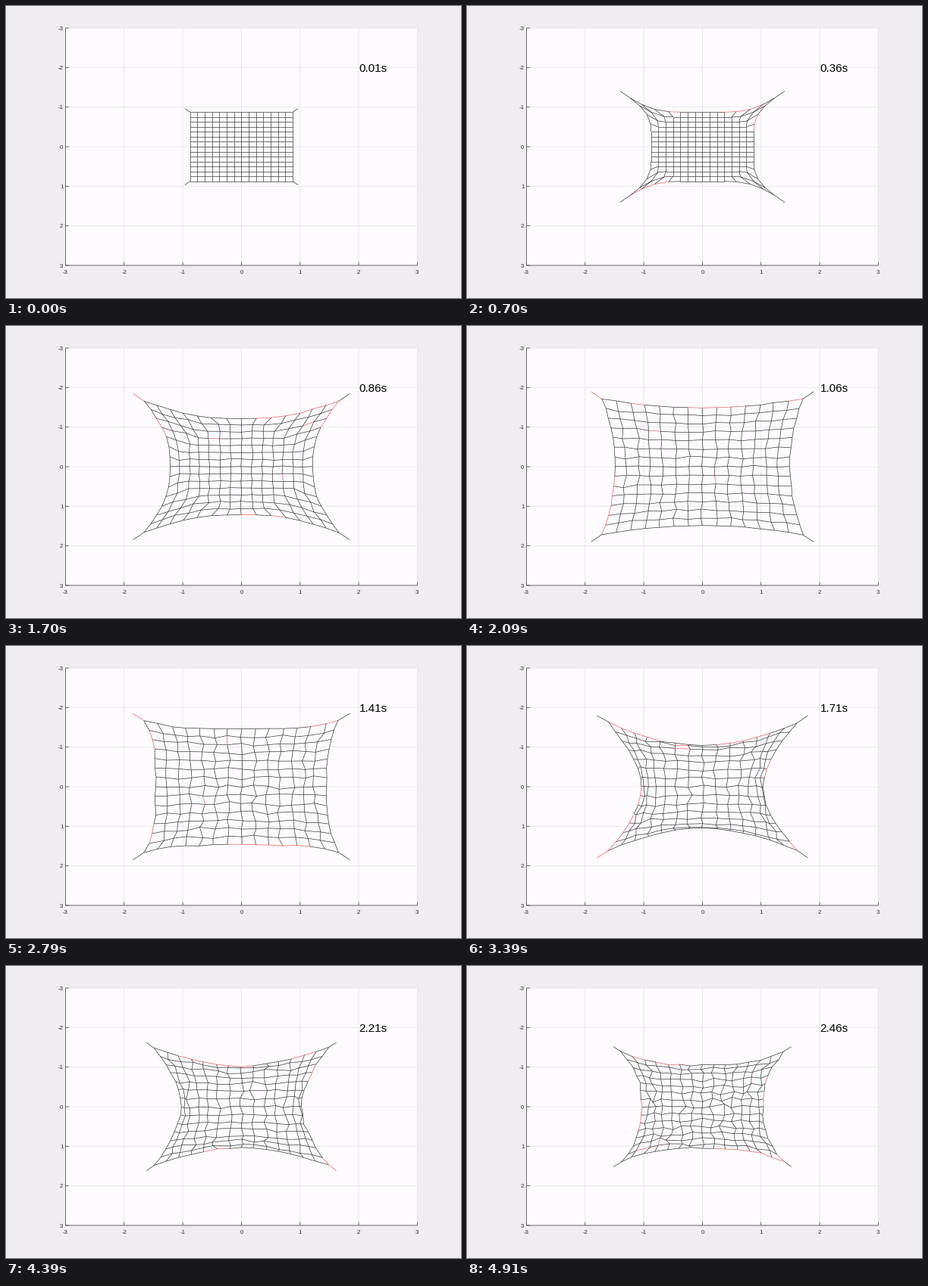
A matplotlib script that plays this animation: 600x386 px, repeating every 5 s.

```python
import numpy as np
import matplotlib.pyplot as plt
from matplotlib.animation import FuncAnimation
from matplotlib.collections import LineCollection

plt.rcParams["font.family"] = "Liberation Sans"
W, H, DPI = 600, 386, 100
PX = 72 / DPI
STEPS, SUB, INTERVAL = 50, 5, 20
DT = .05
N, ROPE = 15, .25
CENTRE, SCALE = np.array([310.4, 186.0]), np.array([77.33, 52.3])
INK, RED, AXIS, GRID = "#2a2a2a", "#f05050", "#505050", "#e3e2e4"

side = np.linspace(-1, 1, N)
UV = np.stack(np.meshgrid(side, side), axis=-1)
CORNERS = UV[::N - 1, ::N - 1]


def to_px(p):
    return CENTRE + SCALE * np.asarray(p, float)


def slopes(times, values, start, gain=1.0):
    h = np.diff(times).reshape((-1,) + (1,) * (values.ndim - 1))
    s = np.diff(values, axis=0) / h
    inner = gain * (s[:-1] * h[1:] + s[1:] * h[:-1]) / (h[1:] + h[:-1])
    return np.concatenate([[start], inner, s[-1:]])


def hermite(t, times, values, tangents):
    i = int(np.clip(np.searchsorted(times, t) - 1, 0, len(times) - 2))
    h = times[i + 1] - times[i]
    u = (t - times[i]) / h
    return ((1 + 2 * u) * (1 - u) ** 2 * values[i]
            + u * (1 - u) ** 2 * h * tangents[i]
            + u * u * (3 - 2 * u) * values[i + 1]
            + u * u * (u - 1) * h * tangents[i + 1])


# Distance of the four flying weights from the centre, along each axis.
TIP_T = np.array([.01, .61, .91, 1.06, 1.41, 1.71, 2.46])
TIPS = np.array([.965, 1.662, 1.87, 1.897, 1.85, 1.797, 1.518])
TIP_V = slopes(TIP_T, TIPS, 1.25)


def tip_at(t):
    return hermite(t, TIP_T, TIPS, TIP_V)


def tighten(net, tip):
    """One relaxation pass: strings longer than ROPE pull their ends together."""
    def excess(d):
        length = np.linalg.norm(d, axis=-1, keepdims=True)
        return d * np.clip(1 - ROPE / np.maximum(length, 1e-9), 0, None)

    pull = np.zeros_like(net)
    across = excess(np.diff(net, axis=1)) / 4
    down = excess(np.diff(net, axis=0)) / 4
    pull[:, :-1] += across
    pull[:, 1:] -= across
    pull[:-1] += down
    pull[1:] -= down
    pull[::N - 1, ::N - 1] += excess(CORNERS * tip - net[::N - 1, ::N - 1]) / 2
    return net + pull


def unfold(last_step, substeps=10, passes=40):
    """Fly the folded net open: free nodes drift, taut strings drag them."""
    net = before = .875 * UV
    states = [net]
    for n in range(1, last_step * substeps + 1):
        tip = tip_at(.01 + n * DT / substeps)
        net, before = 2 * net - before, net
        for _ in range(passes):
            net = tighten(net, tip)
        if n % substeps == 0:
            states.append(net)
    return states


def pose(corner, mid, bunch, power, wobble, seed):
    """Net with curved sides; bunch > 1 crowds the strings near mid-sides."""
    u, v = UV, np.abs(UV[..., ::-1])
    reach = mid + (corner - mid) * v ** power
    b = bunch + (1 - bunch) * v ** 2
    noise = np.random.default_rng(seed).normal(0, wobble, UV.shape)
    loose = np.where(np.abs(UV).max(-1, keepdims=True) < 1, 1, .4)
    return reach * (b * u + (1 - b) * u ** 3) + noise * loose


OPENING = unfold(12)
NET_T = np.array([.61, 1.06, 1.41, 1.71, 2.21, 2.46])
NETS = np.array([OPENING[-1],
                 pose(1.716, 1.49, 1.05, 2.0, .016, 1),
                 pose(1.665, 1.46, 1.05, 3.5, .022, 2),
                 pose(1.617, 1.04, 1.48, 1.8, .020, 3),
                 pose(1.488, 1.025, 1.37, 1.7, .022, 4),
                 pose(1.390, 1.045, 1.20, 2.7, .027, 5)])
NET_V = slopes(NET_T, NETS, (OPENING[-1] - OPENING[-2]) / DT, gain=.5)


def strings_at(step):
    t = .01 + DT * step
    net = (OPENING[step] if step < len(OPENING)
           else hermite(t, NET_T, NETS, NET_V))
    rows = np.stack([net[:, :-1], net[:, 1:]], axis=2)
    cols = np.stack([net[:-1], net[1:]], axis=2).transpose(1, 0, 2, 3)
    threads = np.stack([CORNERS * tip_at(t), net[::N - 1, ::N - 1]], axis=2)
    return np.concatenate([s.reshape(-1, 2, 2) for s in (rows, cols, threads)])


def taut_mask(step, segs):
    """Short runs of stretched string, mostly along the border."""
    rng = np.random.default_rng(100 + step)
    mask = np.zeros(len(segs), bool)
    for n in range(10):
        border = n < 7
        line = rng.choice([0, N - 1]) if border else rng.integers(1, N - 1)
        start = rng.integers(0, N - 1)
        stop = min(N - 1, start + (rng.integers(1, 5) if border else 1))
        first = (N - 1) * (line + N * rng.integers(2))
        mask[first + start:first + stop] = True
    mask[-4:] = rng.random(4) < .12
    return mask & (np.linalg.norm(segs[:, 1] - segs[:, 0], axis=1) > .19)


fig = plt.figure(figsize=(W / DPI, H / DPI), dpi=DPI, facecolor="#efedf0")
ax = fig.add_axes([0, 0, 1, 1])
ax.set_xlim(0, W)
ax.set_ylim(H, 0)
ax.axis("off")

LEFT, TOP = to_px((-3, -3))
RIGHT, BOTTOM = to_px((3, 3))
ax.add_patch(plt.Rectangle((LEFT, TOP), RIGHT - LEFT, BOTTOM - TOP,
                           fc="#fdfbfe", ec="none", zorder=0))


def rule(x, y, color, zorder):
    ax.plot(x, y, color=color, lw=.8 * PX, zorder=zorder,
            solid_capstyle="butt", snap=False)


for value in range(-3, 4):
    x, y = to_px((value, value))
    rule([x, x], [TOP, BOTTOM], GRID, 1)
    rule([LEFT, RIGHT], [y, y], GRID, 1)
    rule([x, x], [BOTTOM, BOTTOM - 4.6], AXIS, 2)
    rule([LEFT, LEFT + 4.6], [y, y], AXIS, 2)
    label = dict(fontsize=7.9 * PX, color="#2c2c2c", va="center_baseline")
    ax.text(x, 352, str(value), ha="center", **label)
    ax.text(75.3, y + .3, str(value), ha="right", **label)
rule([LEFT, LEFT], [TOP, BOTTOM], AXIS, 2)
rule([LEFT, RIGHT], [BOTTOM, BOTTOM], AXIS, 2)

strings = LineCollection([], linewidths=.65 * PX, zorder=3)
ax.add_collection(strings)
clock = ax.text(465.4, 87, "", fontsize=15.3 * PX, color="black",
                va="baseline", zorder=4)


def draw(i):
    # Each pose lasts SUB ticks and arrives one tick before the full tenth.
    step = min((i + 1) // SUB, STEPS - 1)
    segs = strings_at(step)
    strings.set_segments(to_px(segs))
    strings.set_color([RED if taut else INK for taut in taut_mask(step, segs)])
    clock.set_text(f"{.01 + DT * step:.2f}s")
    return strings, clock


anim = FuncAnimation(fig, draw, frames=STEPS * SUB, interval=INTERVAL,
                     repeat=True, repeat_delay=0)
plt.show()
```
